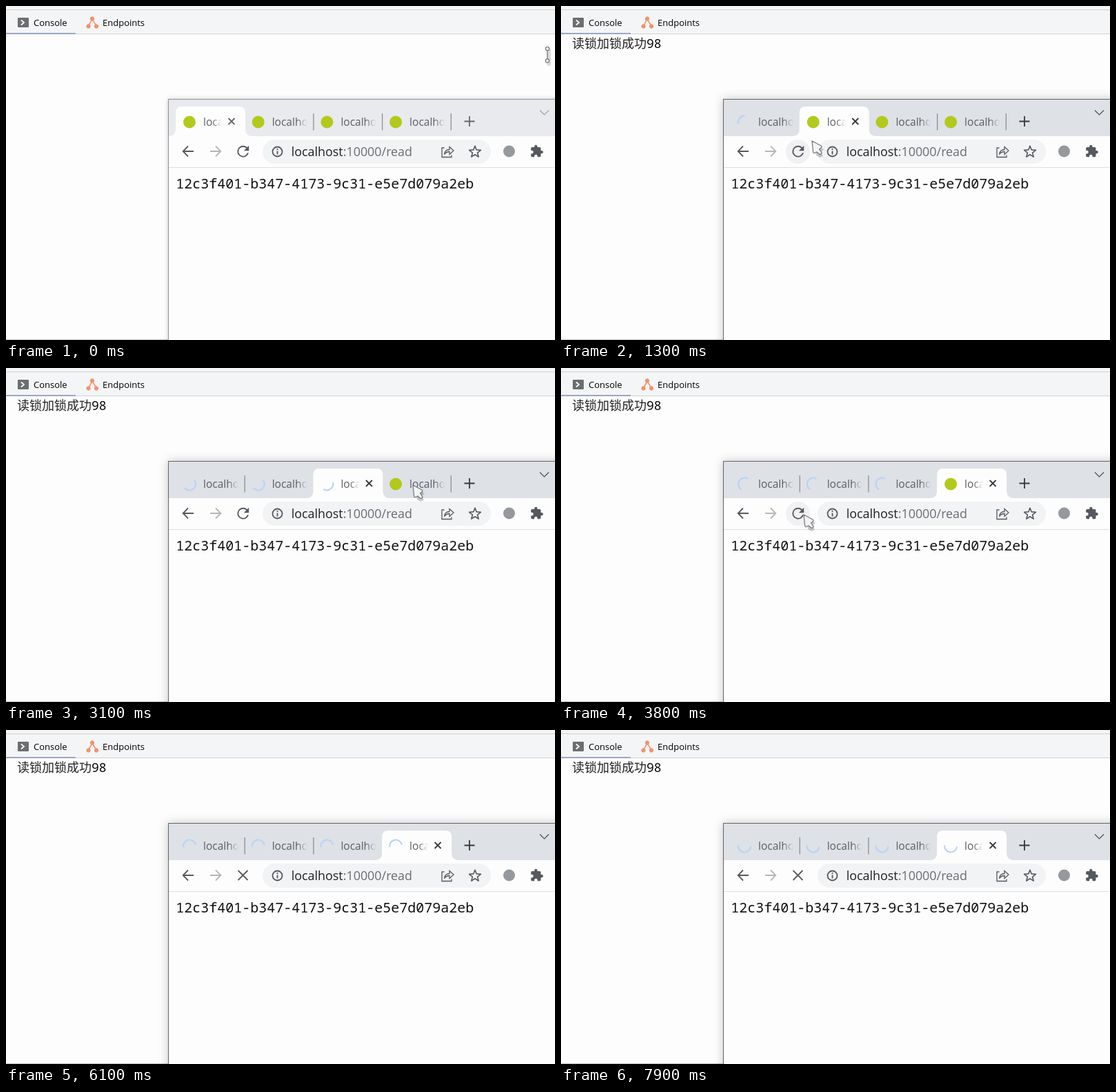
Recreate the animation shown at these times as an HTML page. Size 796 by 485 pixels, loop 8 s.

```html
<!DOCTYPE html>
<html lang="en">
<head>
<meta charset="utf-8">
<title>Read lock demo</title>
<style>
  html, body { margin: 0; width: 100%; height: 100%; overflow: hidden; background: #fdfdfd; }
  svg { display: block; width: 796px; height: 485px; }
  text { white-space: pre; }
  .ui { font: 13px "Open Sans", "Noto Sans", sans-serif; fill: #000; }
  .title { font: 15.5px "Open Sans", "Noto Sans", sans-serif; fill: #5b5f64; }
  .url { font: 17.9px "Open Sans", "Noto Sans", sans-serif; fill: #202124; }
  .page { font: 20px "Noto Sans Mono", "DejaVu Sans Mono", monospace; fill: #111; }
  .log { font: 300 18px "Noto Sans CJK SC", "Noto Sans CJK", sans-serif; fill: #222; }
  .log tspan { font: 500 18px "Noto Sans Mono", "DejaVu Sans Mono", monospace; fill: #080808; }
  .line { fill: none; stroke: #55595e; stroke-width: 1.8; }
  #frame { fill: #fdfdfd; stroke: #8f9195; filter: drop-shadow(0 0 3px rgba(0,0,0,.2)); }
  #strip { fill: #e8eaed; }
  .focus #frame { stroke: #626468; filter: drop-shadow(0 0 7px rgba(0,0,0,.22)); }
  .focus #strip { fill: #dee1e6; }
  .top { stroke: #63666a; }
  .focus .top { stroke: #35383c; }
  #chevron { stroke: #a0a2a6; stroke-width: 1.2; }
  .focus #chevron { stroke: #4a4d51; }
  .spin { fill: none; stroke: #b9d3f8; stroke-width: 2.2; }
</style>
</head>
<body>
<svg id="stage" viewBox="0 0 796 485">
  <defs>
    <linearGradient id="wide" gradientUnits="userSpaceOnUse" x1="76" x2="91">
      <stop stop-color="#fff"/><stop offset="1" stop-color="#000"/>
    </linearGradient>
    <linearGradient id="narrow" gradientUnits="userSpaceOnUse" x1="53" x2="67">
      <stop stop-color="#fff"/><stop offset="1" stop-color="#000"/>
    </linearGradient>
    <mask id="wideFade" maskUnits="userSpaceOnUse" x="36" y="146" width="56" height="42">
      <rect x="36" y="146" width="56" height="42" fill="url(#wide)"/>
    </mask>
    <mask id="narrowFade" maskUnits="userSpaceOnUse" x="36" y="146" width="32" height="42">
      <rect x="36" y="146" width="32" height="42" fill="url(#narrow)"/>
    </mask>
  </defs>

  <!-- console panel -->
  <rect width="796" height="485" fill="#fdfdfd"/>
  <rect width="796" height="41" fill="#f4f5f6"/>
  <path d="M0 5.5H796M0 40.5H796" stroke="#cfd1d4"/>
  <path d="M0 40H101" stroke="#9aa6c2" stroke-width="2"/>
  <path d="M0 484.5H236" stroke="#bfc0c3"/>
  <rect x="17" y="17" width="16" height="14" rx="1" fill="#6c6e71"/>
  <path d="M22 20.5L26 24L22 27.5" fill="none" stroke="#fff" stroke-width="1.8"/>
  <g fill="#f2926d" stroke="#f2926d">
    <path d="M119.5 29L125 19L131 29" fill="none" stroke-width="1.6"/>
    <circle cx="125" cy="18.5" r="2.7"/><circle cx="119.5" cy="29.5" r="2.7"/><circle cx="131" cy="29.5" r="2.7"/>
  </g>
  <text class="ui" x="40" y="29">Console</text>
  <text class="ui" x="140" y="29">Endpoints</text>
  <text class="log" id="log" x="16" y="61">读锁加锁成功<tspan>98</tspan></text>

  <!-- browser window -->
  <rect id="frame" x="235.5" y="135.5" width="600" height="400"/>
  <rect id="strip" x="236" y="136" width="560" height="53"/>
  <g id="tabs"></g>
  <path class="line top" d="M664.5 167.5H679.5M672 160V175"/>
  <path class="line" id="chevron" d="M774 151.5L780.5 158L787 151.5"/>
  <path d="M236 234.5H796" stroke="#dcdee2"/>

  <!-- toolbar -->
  <circle id="hover" cx="343.5" cy="211.5" r="17.5" fill="#f1f1f3"/>
  <path class="line" d="M272 211H257M264 203.5L256.7 211L264 218.5"/>
  <path class="line" style="stroke:#b4b6b9" d="M296 211H311M304 203.5L311.3 211L304 218.5"/>
  <path id="reload" fill="#55595e" transform="translate(331.2 198.6) scale(1.05)"
    d="M17.65 6.35A7.96 7.96 0 0 0 12 4a8 8 0 1 0 7.73 10h-1.9A6.2 6.2 0 1 1 12 5.8c1.66 0 3.24.69 4.32 1.88L13 11h7V4z"/>
  <path class="line" id="stop" d="M336.5 204L350.5 218M350.5 204L336.5 218"/>
  <rect x="372" y="194" width="331" height="35" rx="17.5" fill="#f1f3f4"/>
  <circle class="line" cx="393.5" cy="211.5" r="7"/>
  <path class="line" d="M393.5 210.5V215.500M393.500 207V209"/>
  <text class="url" x="413.700" y="218">localhost<tspan fill="#6a6e73">:10000/read</tspan></text>
  <g class="line" style="stroke-width:1.3">
    <path d="M635.5 206H632V219.5H646V216.5"/>
    <path d="M635.5 215.500Q636.500 208.500 643 208.500V204.500L649 210L643 215.500V211.500Q638.500 211.500 635.500 215.500Z"/>
    <path id="star" stroke-width="1.6" stroke-linejoin="round"/>
  </g>
  <circle cx="729.5" cy="211" r="8.5" fill="#96999c"/>
  <path fill="#55595e" transform="translate(759.5 200.8) scale(.84)"
    d="M20.5 11H19V7c0-1.1-.9-2-2-2h-4V3.5a2.5 2.5 0 0 0-5 0V5H4c-1.1 0-2 .9-2 2v3.8H3.500a2.700 2.700 0 0 1 0 5.400H2V20c0 1.100.9 2 2 2h3.800v-1.500a2.700 2.700 0 0 1 5.400 0V22H17c1.100 0 2-.9 2-2v-4h1.500a2.500 2.500 0 0 0 0-5z"/>
  <text class="page" x="246.3" y="265">12c3f401-b347-4173-9c31-e5e7d079a2eb</text>

  <!-- pointers -->
  <g id="beam" fill="#fdfdfd" stroke="#77797c" stroke-width="1.3">
    <path d="M787 64V84" stroke="#dcdcdd" stroke-width="6" stroke-linecap="round"/>
    <path d="M785 65V77"/>
    <circle cx="785" cy="62" r="2.6"/><circle cx="785" cy="79.5" r="2.6"/>
  </g>
  <g id="arrow" stroke-linejoin="round">
    <path d="M3 4L17 12L13 16L16 22L11 24L6 21Z" fill="#000" opacity=".2"/>
    <path d="M0 0L13 7Q15 8.500 13 10L10.500 12L14 17Q14 19 11 19.500L7 16L3.500 17.500Q1.500 18 1.500 15Z" fill="#f4f4f5" stroke="#77797d" stroke-width="1.3"/>
  </g>
</svg>
<script>
const LOOP = 8000, STEP = 100;
const SPIN_PERIOD = 1235;
const FOCUS_AT = 700, LOG_AT = 1100, STOP_AT = 4700, ARROW_END = 4500;
const SELECT_AT = [0, 1200, 2100, 3200];
const LOAD_AT = [1000, 1700, 2700, 4000];
// time, x, y
const PATH = [
  [100, 785, 72], [300, 600, 180], [600, 346, 210], [1000, 348, 211],
  [1200, 388, 170], [1300, 364, 196], [1500, 347, 214], [1700, 347, 213],
  [2000, 468, 175], [2200, 474, 168], [2300, 418, 195], [2500, 347, 208],
  [2700, 348, 208], [3100, 590, 170], [3300, 678, 190], [3600, 400, 211],
  [3800, 352, 213], [4100, 351, 213], [4300, 560, 215], [4400, 763, 217]
];

const $ = id => document.getElementById(id);
const show = (el, on) => { el.style.display = on ? "" : "none"; };

$("star").setAttribute("d", "M" + Array.from({ length: 10 }, (_, i) => {
  const r = i % 2 ? 3.8 : 8.8, a = (i * 36 - 90) * Math.PI / 180;
  return [680 + r * Math.cos(a), 212 + r * Math.sin(a)].map(v => v.toFixed(1));
}).join("L") + "Z");

$("tabs").innerHTML = SELECT_AT.map((_, i) => `
  <g transform="translate(${246 + i * 99.7} 0)">
    <path class="shape" fill="#fdfdfd" d="M-9 189Q0 188 0 179V155Q0 146 9 146H92Q101 146 101 155V179Q101 188 110 189Z"/>
    <path class="rule" d="M100.2 156V180.5" stroke="#85888d" stroke-width="1.2"/>
    <circle class="icon" cx="20" cy="168.5" r="9" fill="#b3c91c"/>
    <circle class="spin" cx="20" cy="168.5" r="9" pathLength="360"/>
    <text class="title" x="40" y="174">localhost</text>
    <path class="line top close" d="M76.500 163L85.500 172M85.500 163L76.500 172"/>
  </g>`).join("");

const tabs = [...$("tabs").children].map(g => {
  const part = name => g.querySelector("." + name);
  return { shape: part("shape"), rule: part("rule"), icon: part("icon"),
           spin: part("spin"), title: part("title"), close: part("close") };
});

function pointer(t) {
  const i = PATH.findIndex(p => p[0] > t);
  if (i < 0) return PATH[PATH.length - 1].slice(1);
  if (i === 0) return PATH[0].slice(1);
  const [t0, x0, y0] = PATH[i - 1], [t1, x1, y1] = PATH[i];
  const k = (t - t0) / (t1 - t0);
  return [x0 + (x1 - x0) * k, y0 + (y1 - y0) * k];
}

function drawTab(tab, i, t, active) {
  const on = i === active, age = t - LOAD_AT[i], loading = age >= 0;
  show(tab.shape, on);
  show(tab.close, on);
  show(tab.rule, !on && i + 1 !== active);
  show(tab.icon, !loading);
  show(tab.spin, loading);
  tab.title.setAttribute("mask", `url(#${on ? "narrow" : "wide"}Fade)`);
  if (!loading) return;
  const sweep = Math.min(180, 20 + age * 0.3);
  const middle = 220 - 360 * (t - 5000) / SPIN_PERIOD;
  tab.spin.setAttribute("stroke-dasharray", `${sweep} 360`);
  tab.spin.setAttribute("transform", `rotate(${middle - sweep / 2} 20 168.5)`);
}

function draw(now) {
  const t = Math.floor(now % LOOP / STEP) * STEP;
  const active = SELECT_AT.filter(s => t >= s).length - 1;
  const [x, y] = pointer(t), arrow = t >= STEP && t < ARROW_END;
  $("stage").classList.toggle("focus", t >= FOCUS_AT);
  show($("log"), t >= LOG_AT);
  show($("reload"), t < STOP_AT);
  show($("stop"), t >= STOP_AT);
  show($("beam"), t < STEP);
  show($("arrow"), arrow);
  show($("hover"), arrow && Math.hypot(x - 344, y - 211) < 28);
  $("arrow").setAttribute("transform", `translate(${x} ${y})`);
  tabs.forEach((tab, i) => drawTab(tab, i, t, active));
}

const start = performance.now();
function tick() {
  draw(performance.now() - start);
  requestAnimationFrame(tick);
}
tick();
</script>
</body>
</html>
```
